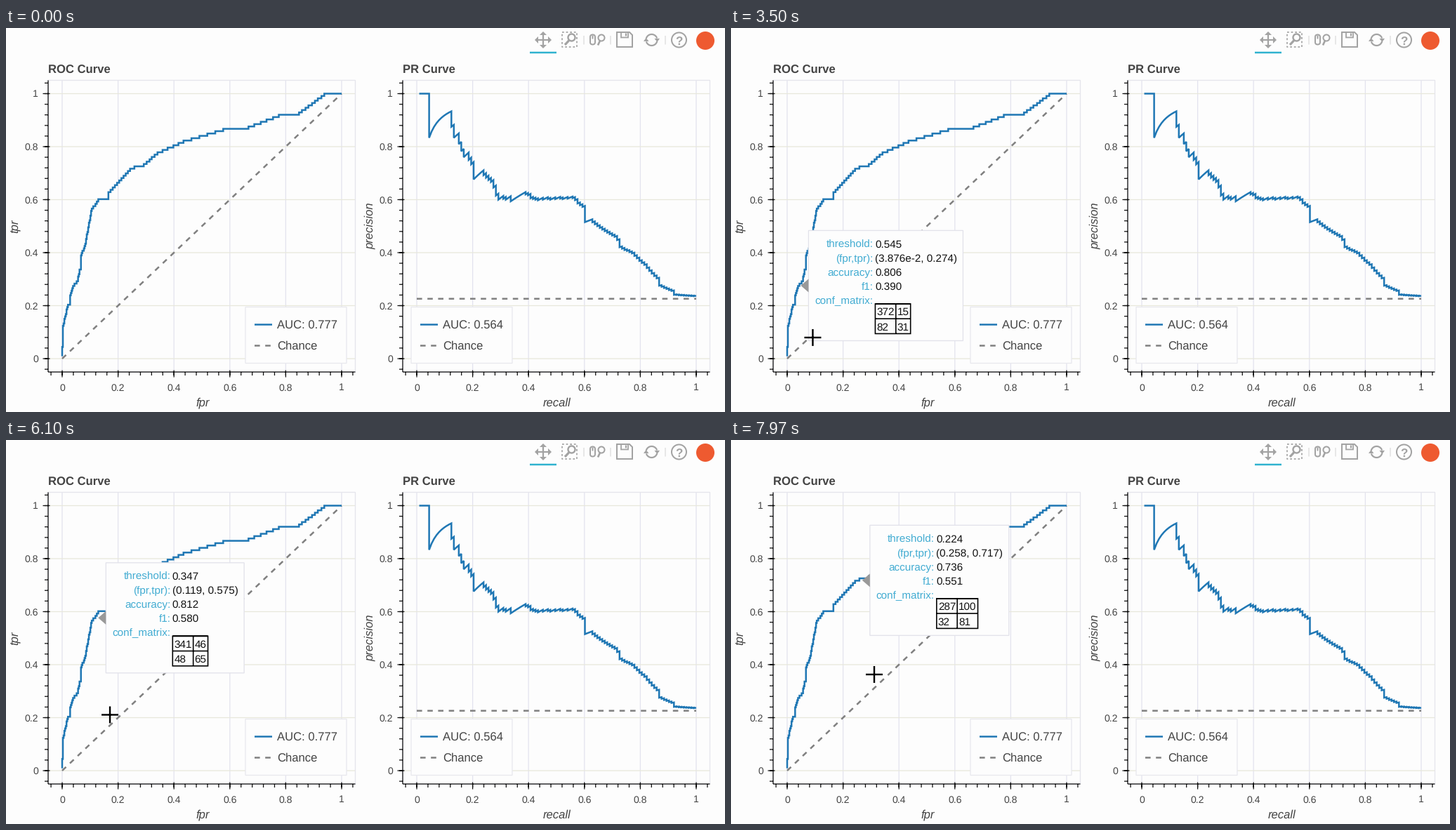
A matplotlib script that plays this animation: 1024 by 547 pixels, repeating every 8000 ms.

```python
import numpy as np
import matplotlib.pyplot as plt
from matplotlib.animation import FuncAnimation
from matplotlib.patches import Circle, FancyBboxPatch, Polygon, Rectangle

W, H, DPI = 1024, 547, 100
LOOP, STEP = 8000, 40
NEG, POS = 387, 113
BG, INK, BLUE, GRAY, ICON = "#fdfdfd", "#444444", "#1f77b4", "#808080", "#a3a3a3"

plt.rcParams["font.family"] = "Liberation Sans"
plt.rcParams["text.hinting"] = "none"
fig = plt.figure(figsize=(W / DPI, H / DPI), dpi=DPI, facecolor=BG)
ax = fig.add_axes([0, 0, 1, 1])
ax.set_xlim(0, W)
ax.set_ylim(H + 0.5, 0.5)
ax.axis("off")


def pt(px):
    return px * 72 / DPI


def line(xs, ys, color, width=1.27, dash=None, z=2):
    style = (0, (dash / width, dash / width)) if dash else "-"
    return ax.plot(xs, ys, color=color, lw=pt(width), ls=style, zorder=z, snap=False,
                   solid_capstyle="butt", dash_capstyle="butt",
                   solid_joinstyle="miter")[0]


def segments(pairs, color, width=1.27, z=2):
    """Draw many separate segments ((x0, y0), (x1, y1)) as one line."""
    pts = np.array([p for a, b in pairs for p in (a, b, (np.nan, np.nan))])
    return line(pts[:, 0], pts[:, 1], color, width, z=z)


def text(x, y, s, size, color=INK, ha="left", z=5, **kw):
    return ax.text(x, y, s, fontsize=pt(size), color=color, ha=ha, va="baseline",
                   zorder=z, rotation_mode="anchor", **kw)


def box(x0, y0, x1, y1, face, edge, z=3):
    return ax.add_patch(Rectangle((x0, y0), x1 - x0, y1 - y0, facecolor=face,
                                  edgecolor=edge, lw=pt(1.27), zorder=z, snap=False))


def ring(x, y, r, width=2):
    ax.add_patch(Circle((x, y), r, fill=False, edgecolor=ICON, lw=pt(width)))


def fill(points, color=ICON, z=3):
    return ax.add_patch(Polygon(points, closed=True, facecolor=color,
                                edgecolor="none", zorder=z))


# Bends of the ranking: (true positives, false positives met before reaching them).
BENDS = np.array([(1, 0), (5, 0), (6, 1), (14, 1), (23, 8), (24, 11), (27, 11),
                  (31, 15), (34, 22), (38, 24), (39, 26), (44, 26), (49, 32),
                  (64, 41), (68, 50), (69, 64), (71, 64), (81, 94), (82, 100),
                  (83, 113), (88, 132), (93, 168), (98, 223), (99, 258),
                  (104, 300), (105, 328), (113, 363)])
hits = np.arange(1, POS + 1)
misses = np.round(np.interp(hits, *BENDS.T)).astype(int)
steps = np.array([p for t, f in zip(hits, misses) for p in ((f, t - 1), (f, t))][1:])
ranks = steps.sum(axis=1)


def px_x(v, left=60):
    return left + 20 + 398 * np.asarray(v)


def px_y(v):
    return 471.5 - 377.5 * np.asarray(v)


def plot_frame(left, title, xlabel, ylabel):
    right, top, bottom = left + 437.5, 75, 490.5
    major = np.arange(6) / 5
    minor = np.arange(-1, 27) / 25
    segments([((x, top), (x, bottom)) for x in px_x(major, left)], "#e3e3ee", z=1)
    segments([((left, y), (right, y)) for y in px_y(major)], "#e8e8dc", z=1)
    box(left, top, right, bottom, "none", "#e5e5ec", z=1)
    segments([((left, top), (left, bottom)), ((left, bottom), (right, bottom))]
             + [((x, bottom - 2.5), (x, bottom + 7.5)) for x in px_x(major, left)]
             + [((x, bottom), (x, bottom + 5)) for x in px_x(minor, left)]
             + [((left - 7.5, y), (left + 2.5, y)) for y in px_y(major)]
             + [((left - 5, y), (left, y)) for y in px_y(minor)], "#111111", z=2)
    for v in major:
        label = f"{v:g}"
        text(px_x(v, left), 517, label, 14, ha="center")
        text(left - 14, px_y(v) + 5, label, 14, ha="right")
    text(left, 65, title, 16.6, weight="bold")
    text(left + 220, 539, xlabel, 16.6, ha="center", style="italic")
    text(left - 42, 282.5, ylabel, 16.6, ha="center", style="italic", rotation=90)


def legend(x0, x1, score):
    box(x0, 398, x1, 478, BG, "#e8e8ee", z=4)
    line([x0 + 13, x0 + 38], [423, 423], BLUE, 2.5, z=5)
    line([x0 + 13, x0 + 38], [453, 453], GRAY, 2.5, 7.6, z=5)
    text(x0 + 45, 429, f"AUC: {score}", 16.6)
    text(x0 + 45, 458.5, "Chance", 16.6)


def toolbar():
    # pan
    segments([((755, 17.5), (775, 17.5)), ((765, 7.5), (765, 27.5))], ICON, 2.2)
    for dx, dy in ((1, 0), (-1, 0), (0, 1), (0, -1)):
        fill([(765 + dx * 12, 17.5 + dy * 12),
              (765 + dx * 7 - dy * 5, 17.5 + dy * 7 + dx * 5),
              (765 + dx * 7 + dy * 5, 17.5 + dy * 7 - dx * 5)])
    line([746, 784], [35.5, 35.5], "#2fb2cf", 2.5)
    # box zoom
    line([792, 813, 813, 792, 792], [6.5, 6.5, 27.5, 27.5, 6.5], ICON, 1.7, 2.8)
    ring(805.5, 14, 5, 2.4)
    line([802, 796], [18, 24.5], ICON, 3.2)
    # wheel zoom
    ax.add_patch(FancyBboxPatch((832, 10), 7, 14, fill=False, edgecolor=ICON, lw=pt(2),
                                boxstyle="round,pad=0,rounding_size=3.4"))
    line([835.5, 835.5], [11, 16], ICON, 2)
    ring(848, 14.5, 4.5)
    line([846, 843], [18.5, 25], ICON, 2.6)
    # save
    line([870, 888, 892, 892, 870, 870], [6.5, 6.5, 10.5, 27.5, 27.5, 5.5], ICON, 2)
    line([876, 876, 886, 886], [7, 14, 14, 7], ICON, 1.8)
    line([883, 883], [8, 12], ICON, 2.2)
    # reset: one arrow, then the same turned by half a circle
    a = np.linspace(1.08, 1.9, 30) * np.pi
    for s in (1, -1):
        line(919.5 + s * 8 * np.cos(a), 17.5 + s * 8 * np.sin(a), ICON, 2.2)
        fill([(919.5 + s * x, 17.5 + s * y) for x, y in ((4, -2), (11.5, -2), (8, 3))])
    # help
    ring(958.5, 17.5, 10.5, 2)
    text(958.5, 24, "?", 17, ICON, ha="center", weight="bold")
    segments([((x, 11.5), (x, 24)) for x in (823, 861, 939)], "#dcdcdc", 1.3)
    ax.add_patch(Circle((996, 18.5), 13, facecolor="#ee5a30", edgecolor="none"))


plot_frame(60, "ROC Curve", "fpr", "tpr")
plot_frame(565, "PR Curve", "recall", "precision")
line(px_x([0, 1]), px_y([0, 1]), GRAY, 2.5, 7.6)
line(px_x([0, 1], 565), px_y([POS / (NEG + POS)] * 2), GRAY, 2.5, 7.6)
line(px_x(np.append(steps[:, 0] / NEG, 1)), px_y(np.append(steps[:, 1] / POS, 1)),
     BLUE, 2.5, z=3)
line(px_x(steps[:, 1] / POS, 565), px_y(steps[:, 1] / ranks), BLUE, 2.5, z=3)
legend(341, 485, "0.777")
legend(577, 721, "0.564")
toolbar()

# Hover tooltip
FIELDS = ("threshold:", "(fpr,tpr):", "accuracy:", "f1:", "conf_matrix:")
panel = box(0, 0, 1, 1, BG, "#e2e2ea", z=10)
pointer = fill([(0, 0), (1, 0), (1, 1)], "#999999", z=10)
names = [text(0, 0, s, 15.2, "#42acd2", ha="right", z=11) for s in FIELDS]
values = [text(0, 0, "", 15.2, "#111111", z=11) for _ in range(4)]
cells = [text(0, 0, "", 15.2, "#111111", z=11) for _ in range(4)]
table = line([], [], "black", 1.6, z=11)
tooltip = [panel, pointer, table, *names, *values, *cells]
cursor = line([], [], "black", 2.4, z=20)

# Key poses: ms, cursor x, cursor y, rank of the hovered point, its threshold
HOVER_START = 1500
MS, CURSOR_X, CURSOR_Y, RANK, THRESHOLD = np.array([
    (400, 87, 563, 0, 0.84),
    (1200, 94.5, 499.5, 1, 0.83),
    (2560, 105.5, 459.5, 27, 0.627),
    (4240, 125.5, 426.5, 62, 0.476),
    (5200, 133, 412.5, 81, 0.424),
    (6720, 159, 377, 132, 0.293),
    (7960, 204, 334.5, 181, 0.224)]).T


def number(v):
    if v == 0:
        return "0"
    if v >= 0.1:
        return f"{v:.3f}"
    exp = int(np.floor(np.log10(v)))
    return f"{v / 10 ** exp:.3f}e{exp}"


def place_tooltip(fp, tp):
    tn, fn = NEG - fp, POS - tp
    x, y = px_x(fp / NEG) + 15, px_y(tp / POS)
    facts = (number(np.interp(fp + tp, RANK, THRESHOLD)),
             f"({number(fp / NEG)}, {number(tp / POS)})",
             number((tn + tp) / (NEG + POS)),
             number(2 * tp / (2 * tp + fp + fn)))
    for i, name in enumerate(names):
        name.set_position((x + 92, y - 55 + 20.1 * i))
    for i, (value, s) in enumerate(zip(values, facts)):
        value.set_text(s)
        value.set_position((x + 94.5, y - 55 + 20.1 * i))
    panel.set_bounds(x, y - 79, 103 + values[1].get_window_extent().width, 157)
    pointer.set_xy([(x - 11, y - 0.5), (x, y - 10), (x, y + 9)])

    counts = (tn, fp, fn, tp)
    widths = [4 + 8.45 * max(len(str(counts[c])), len(str(counts[c + 2])))
              for c in (0, 1)]
    x0 = x + 95
    x1, x2 = x0 + widths[0], x0 + sum(widths)
    y0, y1, y2 = y + 25.5, y + 46.7, y + 68
    for cell, n, cx, cy in zip(cells, counts, (x0, x1) * 2, (y0, y0, y1, y1)):
        cell.set_text(str(n))
        cell.set_position((cx + 2, cy + 16.3))
    gap = np.nan
    table.set_data([x0, x2, x2, x0, x0, x2, gap, x1, x1, gap, x0, x2],
                   [y0, y0, y2, y2, y0, y0, gap, y0, y2, gap, y1, y1])


def update(frame):
    t = frame * STEP
    cx = np.interp(t, MS, CURSOR_X)
    cy = np.interp(t, MS, CURSOR_Y)
    cursor.set_data([cx - 12, cx + 12, np.nan, cx, cx],
                    [cy, cy, np.nan, cy - 12, cy + 12])
    hovering = t >= HOVER_START
    for artist in tooltip:
        artist.set_visible(hovering)
    if hovering:
        nearest = np.argmin(np.abs(ranks - np.interp(t, MS, RANK)))
        place_tooltip(*map(int, steps[nearest]))
    return [cursor, *tooltip]


anim = FuncAnimation(fig, update, frames=LOOP // STEP, interval=STEP,
                     repeat=True, repeat_delay=0, blit=False)
plt.show()
```
